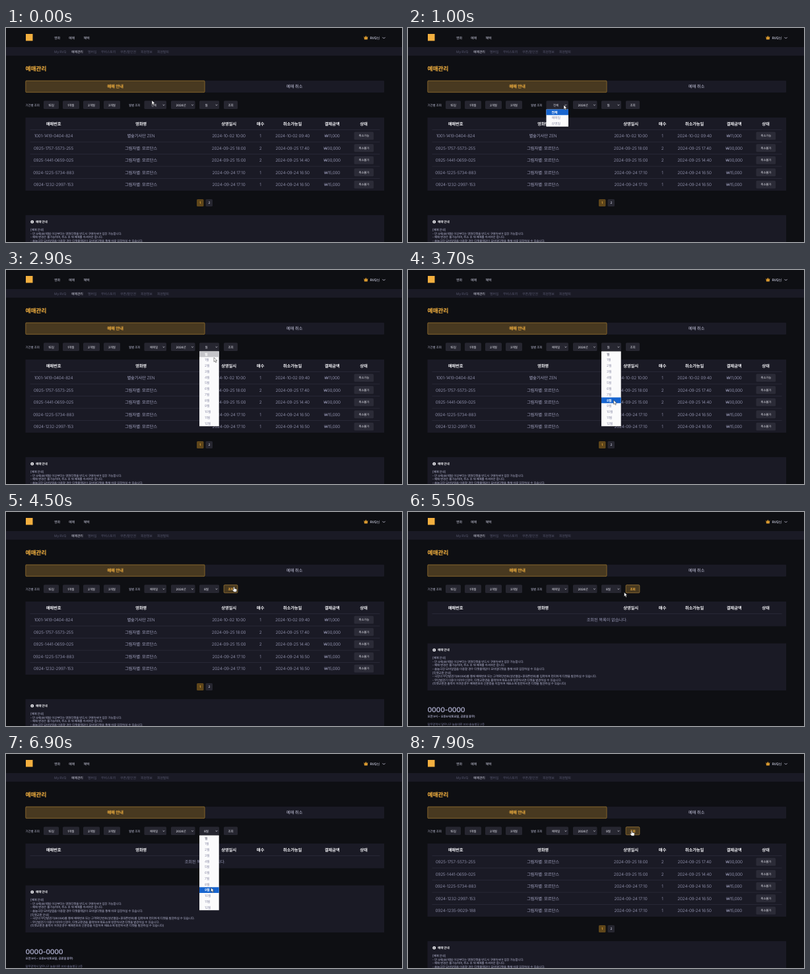
An HTML page that plays this animation: 600 px wide and 325 px high, repeating every 8000 ms.

```html
<!DOCTYPE html>
<html lang="ko">
<head>
<meta charset="utf-8">
<title>예매관리</title>
<style>
  html, body { margin: 0; width: 100%; height: 100%; overflow: hidden; background: #0e0f13; }
  svg { display: block; width: 600px; height: 325px; }
  text {
    font-family: Inter, "Noto Sans CJK KR", "Noto Sans CJK", "Noto Sans KR", sans-serif;
    letter-spacing: -0.03em;
    text-rendering: geometricPrecision;
    white-space: pre;
  }
</style>
</head>
<body>
<svg id="stage" viewBox="0 0 600 325" xmlns="http://www.w3.org/2000/svg"></svg>
<script>
const LOOP = 8000, STEP = 100;
const GOLD = '#f3b03f', EDGE = '#b98b38', ACTIVE = '#483920';
const PANEL = '#1a1a25', CONTROL = '#262630', SOFT = '#a5a6c4', WHITE = '#f2f2f6';

const rect = (x, y, w, h, fill, extra = '') =>
  `<rect x="${x}" y="${y}" width="${w}" height="${h}" fill="${fill}" ${extra}/>`;

// Text placed by the vertical centre of its line.
const text = (x, cy, str, size, fill, weight = 400, anchor = 'start') =>
  `<text x="${x}" y="${cy + size * 0.36}" font-size="${size}" fill="${fill}" font-weight="${weight}" text-anchor="${anchor}">${str}</text>`;
const centred = (x, cy, str, size, fill, weight) => text(x, cy, str, size, fill, weight, 'middle');

const group = (id, body) => `<g id="${id}">${body}</g>`;
const chevron = (x, y, r, color) =>
  `<path d="M${x - r} ${y - r / 2}l${r} ${r}l${r} ${-r}" fill="none" stroke="${color}" stroke-width=".8"/>`;

const button = (x, w, label) =>
  rect(x, 110.5, w, 12.5, CONTROL, 'rx="1.5"') + centred(x + w / 2, 117, label, 4.6, '#dcdce6', 500);

const select = (id, x, w, cx, label) =>
  rect(x, 110.5, w, 12.5, CONTROL, 'rx="1.5"') +
  group(id, centred(cx, 117, label, 4.6, '#dcdce6', 500)) +
  chevron(x + w - 4, 117, 1.3, '#dcdce6');

function header() {
  const menu = [[73, '영화'], [95, '예매'], [117.5, '혜택']];
  const sub = [[73, 'My RVQ'], [99, '예매관리'], [124, '멤버십'], [144, '무비스토리'],
    [173, '쿠폰/할인권'], [204, '회원정보'], [229, '회원탈퇴']];
  return rect(30, 9, 10.5, 10.5, GOLD) +
    menu.map(([x, s]) => text(x, 14.8, s, 5.1, '#c9cadd', 500)).join('') +
    '<path d="M542.3 12.6l1.5 1.6l1.5-2.6l1.5 2.6l1.5-1.6l-.6 5h-4.8z" fill="#d9992f"/>' +
    text(551.5, 14.8, 'RVQ님', 5.1, '#c9cadd', 500) +
    chevron(572.5, 15, 2.1, '#c9cadd') +
    rect(0, 29, 600, 13, '#1a1a25') +
    sub.map(([x, s], i) => text(x, 36, s, 5, i === 1 ? '#d2d3e2' : '#53546a', i === 1 ? 500 : 400)).join('');
}

function controls() {
  return text(29.5, 61.4, '예매관리', 8.9, GOLD, 700) +
    rect(301.5, 80, 271.5, 18, PANEL, 'rx="1"') +
    rect(29.8, 80.1, 271.3, 17.6, ACTIVE, `rx="1" stroke="${EDGE}" stroke-width=".6"`) +
    centred(165.5, 89, '예매 안내', 6.5, GOLD, 600) +
    centred(437, 89, '예매 취소', 6.5, '#bcbdd3', 500) +
    text(29.5, 117, '기간별 조회', 4.5, '#b9bad2') +
    button(57, 23, '15일') + button(86, 25, '1개월') + button(117, 25, '2개월') + button(148, 25, '3개월') +
    text(186, 117, '월별 조회', 4.5, '#b9bad2') +
    select('kind', 209.5, 33.5, 224, '전체') +
    select('year', 250, 36.5, 265, '2024년') +
    select('month', 293, 30, 303.5, '월') +
    button(330, 21, '조회') +
    group('active', rect(330.1, 110.8, 20.8, 12, ACTIVE, `rx="1.3" stroke="${EDGE}" stroke-width=".6"`) +
      centred(340.5, 117, '조회', 4.6, GOLD, 600));
}

const COLUMNS = [72, 204.5, 337.5, 385.5, 434, 494, 542];
const HEADINGS = ['예매번호', '영화명', '상영일시', '매수', '취소가능일', '결제금액', '상태'];
const FIRST = '별숲기사단 ZEN', SECOND = '그림자별: 모르단스';
const BOOKINGS = [
  ['1001-1419-0404-824', FIRST, '2024-10-02 10:00', 1, '2024-10-02 09:40', '₩11,000', '취소가능'],
  ['0925-1757-5573-255', SECOND, '2024-09-25 18:00', 2, '2024-09-25 17:40', '₩30,000', '취소불가'],
  ['0925-1441-0659-025', SECOND, '2024-09-25 15:00', 2, '2024-09-25 14:40', '₩30,000', '취소불가'],
  ...['0924-1225-5734-883', '0924-1232-2997-153', '0924-1235-9029-188'].map(no =>
    [no, SECOND, '2024-09-24 17:10', 1, '2024-09-24 16:50', '₩15,000', '취소불가'])
];

const divider = y => rect(36.5, y, 530, 0.5, '#353544');

const tableHead = height => rect(29.5, 136, 543.5, height, PANEL) +
  HEADINGS.map((s, i) => centred(COLUMNS[i], 145.5, s, 6.4, WHITE, 600)).join('') + divider(154.2);

function bookingRow(cells, i) {
  const cy = 163.8 + i * 18.5;
  return cells.map((s, c) => c < 6
    ? centred(COLUMNS[c], cy, s, 6.4, SOFT, 300)
    : rect(527.5, cy - 6, 29.5, 12, '#2b2b37', 'rx="1.5"') + centred(542.3, cy, s, 4.4, '#e6e6ee', 500)
  ).join('') + (i < 4 ? divider(172.8 + i * 18.5) : '');
}

const bookingTable = rows => tableHead(111) + rows.map(bookingRow).join('') +
  rect(289, 260, 10.5, 11, '#5f461a', 'rx="1.5"') + centred(294.2, 265.5, '1', 4.8, GOLD, 600) +
  rect(302.5, 260, 10.5, 11, CONTROL, 'rx="1.5"') + centred(307.8, 265.5, '2', 4.8, '#c9cadd', 500);

const emptyTable = () => tableHead(37.5) + centred(301.5, 164, '조회된 목록이 없습니다.', 6.4, '#9293b0', 300);

const NOTICE = [
  '[예매 안내]',
  '- 만 4세(48개월) 이상부터는 영화티켓을 반드시 구매하셔야 입장 가능합니다.',
  '- 예매 변경은 불가능하며, 취소 후 재 예매를 하셔야만 합니다.',
  '- 솔늘극장 모바일앱을 이용할 경우 티켓출력없이 모바일티켓을 통해 바로 입장하실 수 있습니다.',
  '[티켓교환 안내]',
  '- 극장의 무인발권기(KIOSK)를 통해 예매번호 또는 고객확인번호(생년월일+휴대폰번호)를 입력하여 편리하게 티켓을 발권하실 수 있습니다.',
  '- 무인발권기 이용이 어려우신경우, 티켓교환권을 출력하여 매표소에 방문하시면 티켓을 발권하실 수 있습니다.',
  '(티켓교환권 출력이 어려운경우 예매번호와 신분증을 지참하여 매표소에 방문하시면 티켓을 발권하실 수 있습니다)'
];

const notice = () => rect(29.5, 199.5, 543.5, 71.5, PANEL) +
  '<circle cx="39.7" cy="209.7" r="2.4" fill="#f2f2f6"/>' + rect(39.4, 208.2, 0.7, 3, PANEL) +
  text(45, 209.8, '예매 안내', 4.7, WHITE, 700) +
  NOTICE.map((s, i) => text(37, 221.7 + i * 5.58, s, 4.48, '#b9bad6')).join('') +
  text(29.5, 300, '0000-0000', 10.4, SOFT, 600) +
  text(29.5, 310, '오전 9시 ~ 오후6시(토요일, 공휴일 휴무)', 4.4, SOFT, 600) +
  text(29.5, 322.6, '달무광역시 달무나구 늘솔대로 000 솔늘빌딩 2층', 4.4, '#77789a');

const ROW = 8.75, LIST_TOP = 123.5;
const MONTHS = ['월', ...Array.from({ length: 12 }, (_, i) => `${i + 1}월`)];
const KINDS = ['전체', '예매일', '상영일'];

function optionList(x, w, labels, chosen, highlight) {
  return rect(x, LIST_TOP, w, labels.length * ROW, '#fbfbfc') +
    labels.map((s, i) => {
      const y = LIST_TOP + i * ROW, on = i === chosen;
      return (on ? rect(x, y, w, ROW, highlight) : '') +
        text(x + 8, y + ROW / 2, s, 5, on ? '#fff' : i ? '#8d8ea8' : '#55566a', on ? 600 : 400);
    }).join('');
}

// Pointer tip: time, x, y.
const PATH = [
  [0, 221, 110], [100, 222, 110], [400, 238, 111], [550, 238, 111], [800, 236, 115], [1000, 236, 117],
  [1200, 233, 132], [1500, 234, 136], [1700, 241.5, 131], [1850, 242, 131], [2500, 316, 116],
  [2750, 317, 117], [2900, 315, 133], [3200, 312, 165], [3600, 311, 197], [3800, 312, 198],
  [4200, 345, 114], [4500, 345.5, 113.5], [5000, 345, 114], [5200, 345, 114], [5500, 327.5, 122],
  [5800, 317, 117], [6100, 314, 135], [6700, 312, 198], [6900, 310.5, 203], [7200, 311, 203],
  [7600, 339, 116], [8000, 339, 116.5]
];

function pointerAt(t) {
  const i = Math.max(1, PATH.findIndex(p => p[0] > t));
  const [t0, x0, y0] = PATH[i - 1], [t1, x1, y1] = PATH[i];
  const k = (t - t0) / (t1 - t0), e = k * k * (3 - 2 * k);
  return [x0 + (x1 - x0) * e, y0 + (y1 - y0) * e];
}

const ARROW = '<path d="M0 0v6.4l1.5-1.4l1.1 2.5l1.2-.5l-1.1-2.4h2.1z" fill="#fff" stroke="#111" stroke-width=".45"/>';
const HAND = '<path d="M-.8 .5q.8-1 1.6 0v2.3l2.8 .6q.8 .3 .7 1.2l-.6 3.2h-4l-2.3-3q.2-1 1-.6l.8 .7z" fill="#fff" stroke="#111" stroke-width=".45"/>';

const stage = document.getElementById('stage');
stage.innerHTML = rect(0, 0, 600, 325, '#0e0f13') + header() + controls() +
  group('all', bookingTable(BOOKINGS.slice(0, 5))) +
  group('none', emptyTable()) +
  group('september', bookingTable(BOOKINGS.slice(1))) +
  group('notice', notice()) + group('list', '') +
  group('pointer', group('arrow', ARROW) + group('hand', HAND));

const el = id => document.getElementById(id);
const show = (id, on) => el(id).setAttribute('display', on ? 'inline' : 'none');
const setLabel = (id, s) => { el(id).firstChild.textContent = s; };
const within = (t, a, b) => t >= a && t < b;

function openList(t, y) {
  const hovered = Math.floor((y - LIST_TOP) / ROW);
  if (within(t, 1000, 1500)) return optionList(209.5, 33.5, KINDS, Math.max(0, hovered), '#1765cf');
  if (within(t, 2800, 3800)) {
    const idle = t < 3000;
    return optionList(293, 29.7, MONTHS, idle ? 0 : hovered, idle ? '#c6c6ca' : '#1765cf');
  }
  if (within(t, 5900, 7200)) return optionList(293, 29.7, MONTHS, hovered < 0 ? 8 : hovered, '#1765cf');
  return '';
}

function draw(t) {
  const [x, y] = pointerAt(t);
  const empty = within(t, 4800, 7800);
  const overButton = x >= 330 && x <= 351 && y >= 110 && y <= 123;

  setLabel('kind', KINDS[t < 1500 ? 0 : 1]);
  setLabel('month', MONTHS[t < 3800 ? 0 : t < 7200 ? 8 : 9]);
  show('all', t < 4800);
  show('none', empty);
  show('september', t >= 7800);
  el('notice').setAttribute('transform', `translate(0 ${empty ? 0 : 84.7})`);
  show('active', overButton || within(t, 4700, 5900));
  el('list').innerHTML = openList(t, y);
  show('arrow', !overButton);
  show('hand', overButton);
  el('pointer').setAttribute('transform', `translate(${x} ${y})`);
}

const start = performance.now();
function tick() {
  const t = (performance.now() - start) % LOOP;
  draw(Math.floor(t / STEP) * STEP);
  requestAnimationFrame(tick);
}
tick();
</script>
</body>
</html>
```
